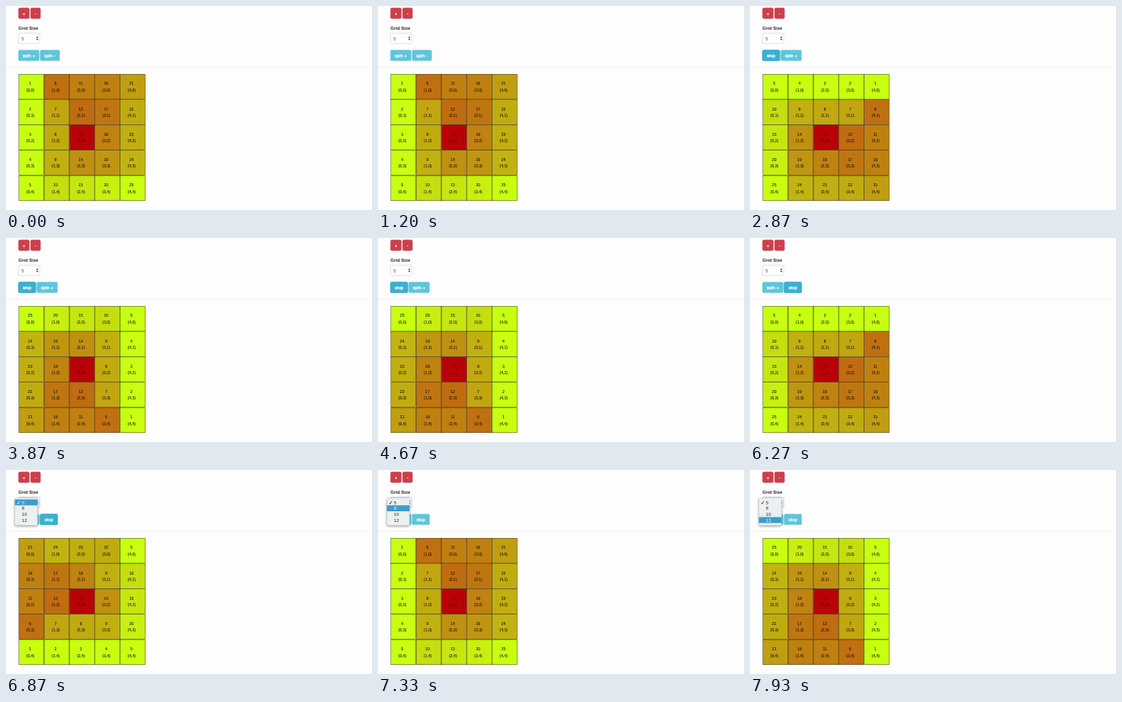
An HTML page for the animation above (8 s loop, 480 by 267 pixels).

```html
<!DOCTYPE html>
<html lang="en">
<head>
<meta charset="utf-8">
<title>Spinning grid</title>
<style>
  html, body { margin: 0; width: 100%; height: 100%; overflow: hidden; background: #fefdfe; }
  svg { display: block; width: 100vw; height: 100vh; font-family: "Liberation Sans", Arial, sans-serif; }
  .btn text { fill: #fff; stroke: #fff; stroke-width: .3; font-size: 6px; text-anchor: middle; }
  .red rect { fill: #cd3f4c; stroke: #bd3844; stroke-width: .4; }
  .blue rect { fill: #5ec5db; stroke: #54bdd6; stroke-width: .4; }
  .blue.on rect { fill: #38b1d4; stroke: #2b9dc0; stroke-width: .8; }
  .cell rect { stroke: #0c0a00; stroke-width: .4; }
  .cell text { font-size: 5.1px; text-anchor: middle; fill: #141000; stroke: #141000; stroke-width: .06; }
  .cell.mid text { fill: #4c0000; stroke: none; }
  .field { fill: #fff; stroke: #c9cdd2; stroke-width: .6; }
  .field.open { stroke: #6db6e6; }
  .menu text { font-size: 6px; fill: #222; }
  .menu text.lit { fill: #fff; }
  .menu .panel { fill: #ebf0f0; stroke: #c4c4c4; stroke-width: .4; filter: drop-shadow(0 1px 1.6px rgba(0,0,0,.4)); }
</style>
</head>
<body>
<svg viewBox="0 0 480 267" preserveAspectRatio="none">
  <path d="M0 80H480" stroke="#ececee" stroke-width=".8"/>
  <text x="16.3" y="31.2" font-size="6" font-weight="bold" fill="#222">Grid Size</text>
  <rect id="field" class="field" x="16.4" y="35.6" width="27.8" height="13.6" rx="1.6"/>
  <text x="20.3" y="44.7" font-size="6" fill="#444">5</text>
  <path d="M39.6 41.8l1.4-2 1.4 2zM39.6 43l1.4 2 1.4-2z" fill="#333"/>
</svg>
<script>
const LOOP = 8000, N = 5, LAST = N - 1, SIZE = 33.2, LEFT = 16.7, TOP = 89;
const svg = document.querySelector('svg');
const field = document.getElementById('field');

function add(parent, tag, attrs, text) {
  const el = document.createElementNS('http://www.w3.org/2000/svg', tag);
  for (const k in attrs) el.setAttribute(k, attrs[k]);
  if (text !== undefined) el.textContent = text;
  parent.appendChild(el);
  return el;
}

function button(kind, y) {
  const g = add(svg, 'g', { class: 'btn ' + kind });
  const box = add(g, 'rect', { y, height: 13.8, rx: 1.6 });
  const label = add(g, 'text', { y: y + 9 });
  return (x, w, text, on) => {
    box.setAttribute('x', x);
    box.setAttribute('width', w);
    label.setAttribute('x', x + w / 2);
    label.textContent = text;
    g.classList.toggle('on', !!on);
  };
}

button('red', 2.6)(16.5, 14, '+');
button('red', 2.6)(32.2, 13, '-');
const first = button('blue', 57.8), second = button('blue', 57.8);

// Green channel of each value, 1 to 25.
const greens = [
  255, 255, 255, 255, 255,
  112, 166, 170, 176, 222,
  128, 108, 0, 144, 230,
  128, 118, 130, 150, 240,
  158, 172, 174, 180, 255];

function colour(v) {
  if (v === 13) return '#b90208';
  const g = greens[v - 1];
  const r = Math.round(192 + Math.max(0, g - 160) / 12);
  return `rgb(${r},${g},16)`;
}

const base = (x, y) => x * N + y + 1;

function valueAt(x, y, turn) {
  if (turn === 0) return base(x, y);
  if (turn === 1) return base(y, LAST - x);
  if (turn === 2) return base(LAST - x, LAST - y);
  // The third turn mirrors the top and right edge of each ring.
  const r = Math.min(x, y, LAST - x, LAST - y);
  if (x === LAST - r && y < LAST - r) y = LAST - y;
  else if (y === r && x > r) x = LAST - x;
  return base(LAST - y, x);
}

const cells = [];
for (let x = 0; x < N; x++) for (let y = 0; y < N; y++) {
  const px = LEFT + x * SIZE, py = TOP + y * SIZE;
  const g = add(svg, 'g', { class: x === 2 && y === 2 ? 'cell mid' : 'cell' });
  const box = add(g, 'rect', { x: px + .2, y: py + .2, width: SIZE - .4, height: SIZE - .4 });
  const num = add(g, 'text', { x: px + 15, y: py + 14.3 });
  add(g, 'text', { x: px + 15.3, y: py + 22.7 }, `(${x},${y})`);
  cells.push({ x, y, box, num });
}

const menu = add(svg, 'g', { class: 'menu' });
add(menu, 'rect', { class: 'panel', x: 11.6, y: 36.8, width: 29.8, height: 35.6, rx: 2 });
const bar = add(menu, 'rect', { x: 11.6, width: 29.8, height: 7.8, fill: '#3c9dcb' });
const items = [5, 8, 10, 12].map((n, i) => add(menu, 'text', { x: 20.8, y: 44.6 + i * 7.7 }, n));
const check = add(menu, 'path', { d: 'M14.8 43l1.2 1.5 2.2-4', fill: 'none', 'stroke-width': .8 });

// The grid turns once per TICK while a spin runs, first clockwise, then back.
const TICK = 210, FORWARD = 1670, STOP = 5180, BACK = 5640;
const ticks = (from, t) => Math.max(0, Math.floor((t - from) / TICK));
const turnAt = t => (ticks(FORWARD, Math.min(t, STOP)) + 3 * ticks(BACK, t)) % 4;

// Latest entry of [time, value] pairs reached at t.
const at = (steps, t) => steps.reduce((v, s) => (t >= s[0] ? s[1] : v), steps[0][1]);
const hovers = [[0, -1], [6600, 0], [7300, 1], [7500, 2], [7700, 3]];
let shown = -1;

function draw(t) {
  const turn = turnAt(t), hover = at(hovers, t);

  if (t >= FORWARD && t < STOP) {
    first(16.4, 22.6, 'stop', true);
    second(40.4, 27, 'spin +');
  } else {
    first(16.4, 27, 'spin +');
    if (t >= BACK) second(44.8, 22.8, 'stop', t < 7000);
    else second(44.9, 25.4, 'spin -');
  }

  if (turn !== shown) {
    shown = turn;
    for (const c of cells) {
      const v = valueAt(c.x, c.y, turn);
      c.num.textContent = v;
      c.box.setAttribute('fill', colour(v));
    }
  }

  const open = hover >= 0;
  menu.style.display = open ? '' : 'none';
  field.classList.toggle('open', open);
  bar.setAttribute('y', 38.5 + Math.max(0, hover) * 7.7);
  items.forEach((el, i) => el.classList.toggle('lit', i === hover));
  check.setAttribute('stroke', hover === 0 ? '#fff' : '#222');
}

const start = performance.now();
function frame() {
  draw((performance.now() - start) % LOOP);
  requestAnimationFrame(frame);
}
draw(0);
requestAnimationFrame(frame);
</script>
</body>
</html>
```
